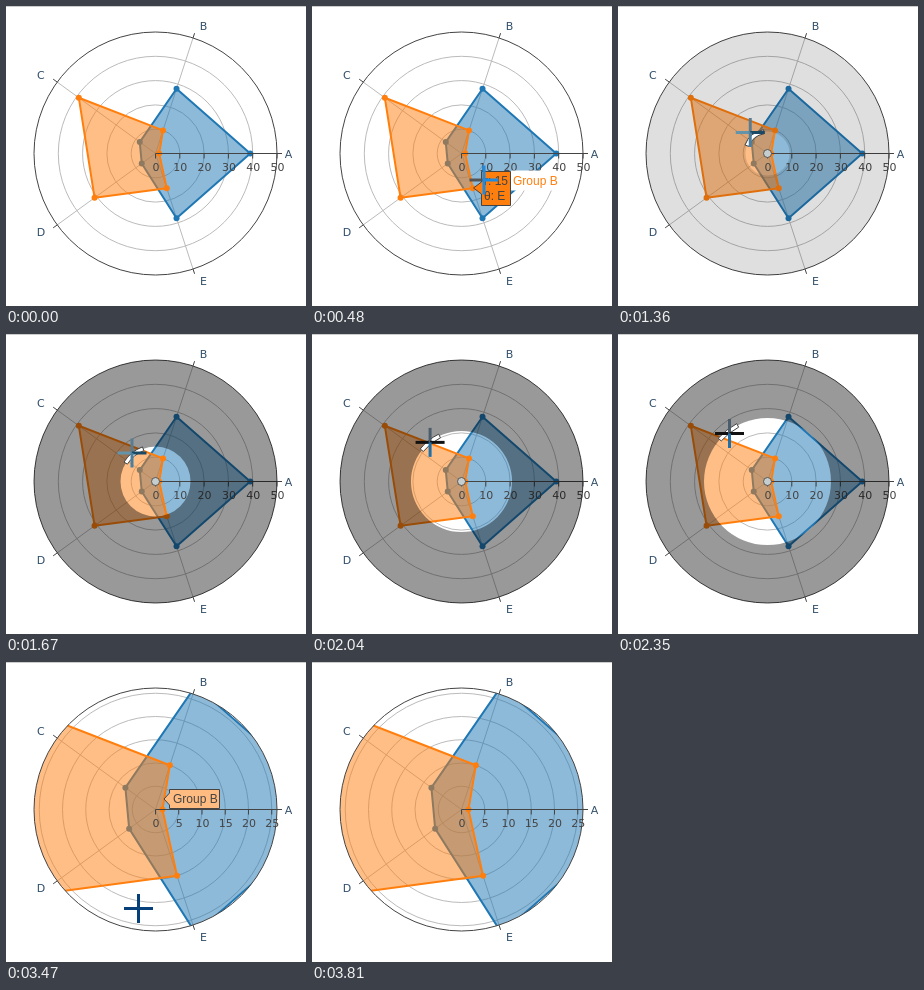
Recreate the animation shown at these times as an HTML page with a canvas. Size 300 by 300 pixels, loop 4.24 s.

```html
<!DOCTYPE html>
<html lang="en">
<head>
<meta charset="utf-8">
<title>Polar chart zoom</title>
<style>
html, body { margin: 0; width: 100%; height: 100%; overflow: hidden; background: #fff; }
canvas { display: block; width: 300px; height: 300px; }
</style>
</head>
<body>
<canvas id="stage"></canvas>
<script>
const LOOP = 4240, SIZE = 300, TAU = Math.PI * 2;
const CX = 149.5, CY = 147.5, R = 121.5;
const ZOOM_R = 63.5;
const INK = '#444', BLUE = '#1f77b4', ORANGE = '#ff7f0e';
const TICK_FONT = '11px "DejaVu Sans", sans-serif';
const HOVER_FONT = '12px "Liberation Sans", Arial, sans-serif';
const LETTERS = 'ABCDE';
const TRACES = [
  { color: BLUE, fill: 'rgba(31,119,180,.5)', r: [39, 28, 8, 7, 28] },
  { color: ORANGE, fill: 'rgba(255,127,14,.5)', r: [1.5, 10, 39, 31, 15] }
];
// pointer path: step, x, y
const PATH = [
  [0, 212, 296], [5, 182, 193], [6, 172, 174], [8, 147, 151], [17, 136, 131],
  [25, 126, 119], [36, 111.5, 99.5], [37, 111.5, 99.5], [44, 136, 271], [47, 138, 304]
];

const canvas = document.getElementById('stage');
const ctx = canvas.getContext('2d');
const dpr = window.devicePixelRatio || 1;
canvas.width = canvas.height = SIZE * dpr;

const polar = (r, a) => [CX + r * Math.cos(a), CY - r * Math.sin(a)];
const spoke = i => i * TAU / 5;

function stroke(color, width = 1) {
  ctx.strokeStyle = color;
  ctx.lineWidth = width;
  ctx.stroke();
}

function line(x1, y1, x2, y2, color, width) {
  ctx.beginPath();
  ctx.moveTo(x1, y1);
  ctx.lineTo(x2, y2);
  stroke(color, width);
}

function disc(x, y, r) {
  ctx.beginPath();
  ctx.arc(x, y, r, 0, TAU);
}

function polygon(points) {
  ctx.beginPath();
  points.forEach(p => ctx.lineTo(p[0], p[1]));
  ctx.closePath();
}

function text(str, x, y, font, color, align = 'left') {
  ctx.font = font;
  ctx.fillStyle = color;
  ctx.textAlign = align;
  ctx.fillText(str, x, y);
}

function drawGrid(scale, step, max) {
  for (let v = step; v * scale < R - 1; v += step) {
    disc(CX, CY, v * scale);
    stroke('#bbb');
  }
  for (let i = 0; i < 5; i++) {
    line(CX, CY, ...polar(R, spoke(i)), '#bbb');
  }
}

function drawTrace(trace, scale) {
  const points = trace.r.map((r, i) => polar(r * scale, spoke(i)));
  ctx.save();
  disc(CX, CY, R);
  ctx.clip();
  polygon(points);
  ctx.fillStyle = trace.fill;
  ctx.fill();
  ctx.lineJoin = 'round';
  stroke(trace.color, 2);
  ctx.restore();
  points.forEach((p, i) => {
    if (trace.r[i] * scale > R) return;
    disc(p[0], p[1], 3);
    ctx.fillStyle = trace.color;
    ctx.fill();
  });
}

function drawAxes(scale, step, max) {
  disc(CX, CY, R);
  stroke(INK);
  for (let i = 0; i < 5; i++) {
    line(...polar(R, spoke(i)), ...polar(R + 5, spoke(i)), INK);
    const [x, y] = polar(R + 11.5, spoke(i));
    const nudge = [0, 7, -7, -7, 7][i];
    text(LETTERS[i], x + nudge, y + 4 - [0, 1, 0, 0, -1][i], TICK_FONT, '#33506b', 'center');
  }
  line(CX, CY, CX + R, CY, INK);
  for (let v = 0; v <= max; v += step) {
    const x = CX + v * scale;
    line(x, CY, x, CY + 5, INK);
    text(v, x + 0.5, 165, TICK_FONT, INK, 'center');
  }
}

function callout(x, y, left, top, right, bottom, fill) {
  polygon([[x, y], [left, y - 6], [left, top], [right, top],
           [right, bottom], [left, bottom], [left, y + 6]]);
  ctx.fillStyle = fill;
  ctx.fill();
  stroke(INK);
}

function drawPointLabel() {
  ctx.fillStyle = '#fff';
  ctx.beginPath();
  ctx.roundRect(198, 164.5, 49, 20, 3);
  ctx.fill();
  callout(161.5, 182, 169.5, 165.5, 198.5, 199.5, ORANGE);
  text('r: 15', 172, 179, HOVER_FONT, INK);
  text('θ: E', 172, 194, HOVER_FONT, INK);
  text('Group B', 201, 179, HOVER_FONT, ORANGE);
}

function drawFillLabel() {
  callout(158, 137, 163.5, 127.5, 213.5, 146.5, '#ffbb80');
  text('Group B', 167, 141, HOVER_FONT, INK);
}

function drawZoomRing(r, angle, alpha) {
  ctx.beginPath();
  ctx.arc(CX, CY, R, 0, TAU);
  ctx.moveTo(CX + r, CY);
  ctx.arc(CX, CY, r, 0, TAU);
  ctx.fillStyle = `rgba(0,0,0,${alpha})`;
  ctx.fill('evenodd');

  disc(CX, CY, 4);
  ctx.fillStyle = '#c6cdcf';
  ctx.fill();
  stroke('#555');

  const half = 11.5 / r;
  ctx.beginPath();
  ctx.arc(CX, CY, r - 2, angle - half, angle + half);
  ctx.arc(CX, CY, r + 2, angle + half, angle - half, true);
  ctx.closePath();
  ctx.fillStyle = '#fff';
  ctx.fill();
  stroke(INK);
}

// arm colours: left, top, right, bottom
function armColors(step) {
  const navy = '#06407a';
  if (step >= 6 && step <= 8) return ['#555', '#1e8ae0', '#1e8ae0', '#1e8ae0'];
  if (step >= 13 && step < 20) return [navy, navy, '#3c74a0', '#3c74a0'];
  if (step >= 20 && step < 30) return ['#6394aa', '#5a7c90', '#1a4a66', '#4a7f9f'];
  if (step >= 30 && step <= 36) return ['#111', '#4b5d6c', '#111', '#1f6fa8'];
  return [navy, navy, navy, navy];
}

function drawPointer(x, y, colors) {
  const arms = [[-1, 0], [0, -1], [1, 0], [0, 1]];
  arms.forEach(([dx, dy], i) => {
    line(x, y, x + dx * 14.5, y + dy * 14.5, colors[i], 3);
  });
}

function pointerAt(step) {
  const i = PATH.findIndex(p => p[0] >= step);
  if (i === 0) return PATH[0].slice(1);
  const a = PATH[i - 1], b = PATH[i];
  const f = (step - a[0]) / (b[0] - a[0]);
  return [a[1] + (b[1] - a[1]) * f, a[2] + (b[2] - a[2]) * f];
}

function stepAt(t) {
  if (t < 3030) return Math.min(36, Math.floor((t - 80) / 63.05));
  return Math.min(48, 37 + Math.floor((t - 3030) / 70.9));
}

function draw(t) {
  const step = stepAt(t);
  const zoomed = step >= 37;
  const max = zoomed ? 50 * ZOOM_R / R : 50;
  const scale = R / max, gap = zoomed ? 5 : 10;

  ctx.setTransform(dpr, 0, 0, dpr, 0, 0);
  ctx.fillStyle = '#fff';
  ctx.fillRect(0, 0, SIZE, SIZE);
  line(0, 0.5, SIZE, 0.5, '#ccc');

  drawGrid(scale, gap, max);
  TRACES.forEach(trace => drawTrace(trace, scale));
  drawAxes(scale, gap, max);

  if (step < 0 || step > 47) return;
  const [x, y] = pointerAt(step);
  if (step >= 6 && step <= 8) drawPointLabel();
  if (step >= 20 && step <= 36) {
    const r = 35 + (step - 25) * (ZOOM_R - 35) / 11;
    drawZoomRing(r, Math.atan2(y - CY, x - CX), 0.4 * Math.min(1, (step - 19) * 0.315));
  }
  if (step >= 37 && step <= 44) drawFillLabel();
  drawPointer(x, y, armColors(step));
}

const start = performance.now();
function tick() {
  draw((performance.now() - start) % LOOP);
  requestAnimationFrame(tick);
}
tick();
</script>
</body>
</html>
```
